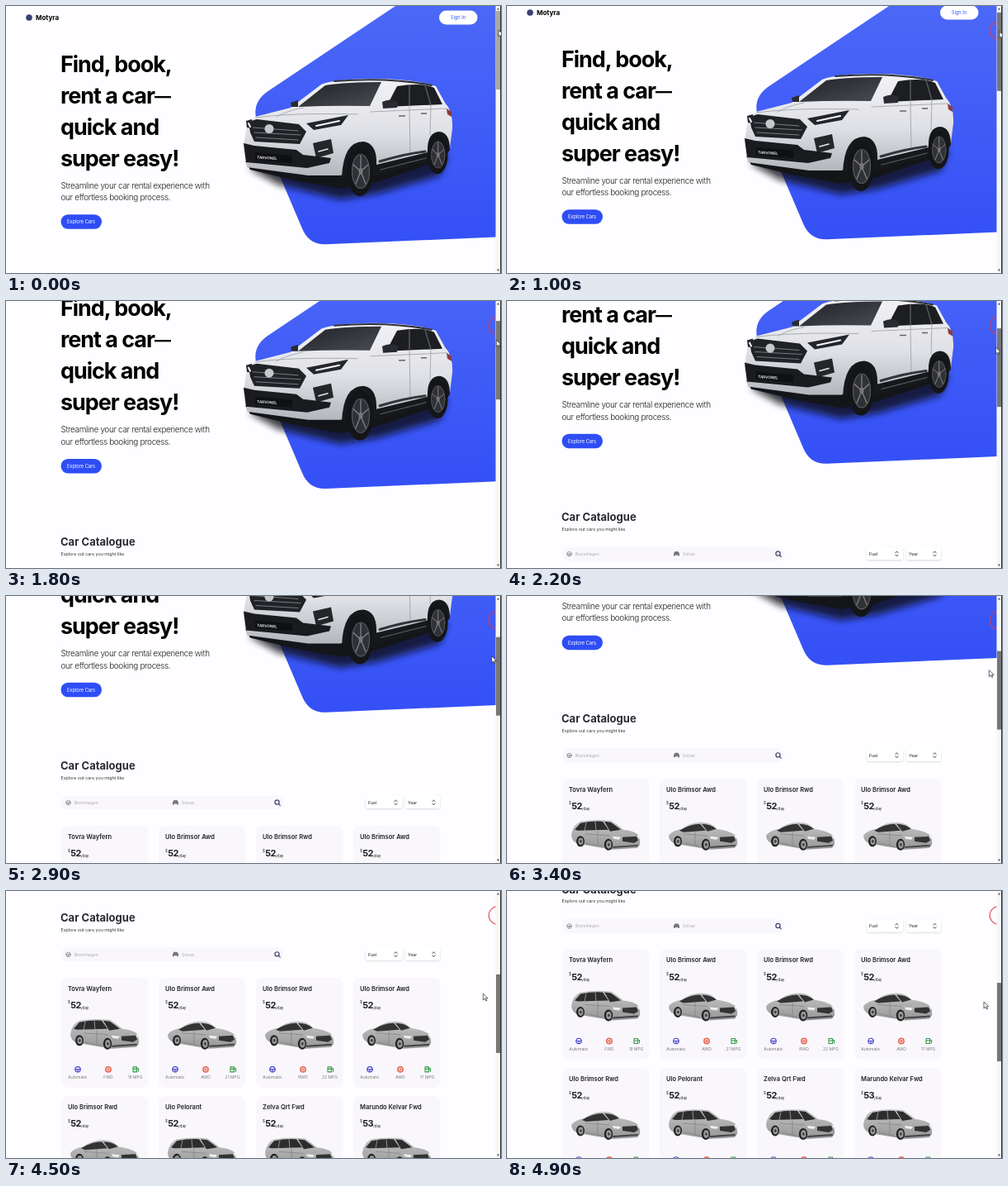
Recreate the animation shown at these times as an HTML page. Size 600 by 323 pixels, loop 5000 ms.

```html
<!DOCTYPE html>
<html lang="en">
<head>
<meta charset="utf-8">
<style>
html, body { margin: 0; width: 100%; height: 100%; overflow: hidden; background: #fefdff; }
svg { display: block; width: 600px; height: 323px; font-family: Inter, "Open Sans", sans-serif; }
.hero { font-size: 27px; font-weight: 700; letter-spacing: -1.05px; }
.lead { font-size: 10px; font-weight: 300; letter-spacing: -.375px; fill: #222; }
.mid { text-anchor: middle; font-size: 5.7px; }
.name { font-size: 7.5px; font-weight: 600; fill: #222; }
.price { font-size: 11px; font-weight: 700; letter-spacing: -.6px; fill: #222; }
.unit { font-size: 4.5px; fill: #222; }
.spec { font-size: 5px; font-weight: 300; text-anchor: middle; fill: #555; }
.hint { font-size: 5px; fill: #aaa; }
.line { fill: none; stroke-linecap: round; stroke-linejoin: round; }
</style>
</head>
<body>
<svg viewBox="0 0 600 323">
  <defs>
    <linearGradient id="blue" x1="0" y1="0" x2="0" y2="1">
      <stop offset="0" stop-color="#526ef8"/><stop offset=".3" stop-color="#4a66f7"/><stop offset="1" stop-color="#3450f6"/>
    </linearGradient>
    <linearGradient id="paint" x1="0" y1="0" x2="0" y2="1">
      <stop offset="0" stop-color="#f2f2f5"/><stop offset=".55" stop-color="#e0e1e6"/><stop offset="1" stop-color="#b4b6bd"/>
    </linearGradient>
    <linearGradient id="grey" x1="0" y1="0" x2="0" y2="1">
      <stop offset="0" stop-color="#c4c4c4"/><stop offset="1" stop-color="#969696"/>
    </linearGradient>
    <linearGradient id="glass" x1="0" y1="0" x2="1" y2="1">
      <stop offset="0" stop-color="#1f2125"/><stop offset="1" stop-color="#4a4d54"/>
    </linearGradient>
    <filter id="soft" x="-20%" y="-60%" width="140%" height="220%"><feGaussianBlur stdDeviation="4"/></filter>
    <filter id="lift" x="-10%" y="-20%" width="120%" height="160%"><feDropShadow dx="0" dy="1" stdDeviation="1" flood-opacity=".16"/></filter>

    <g id="wheel">
      <ellipse rx="16" ry="30" fill="#141518"/>
      <ellipse cx="1" rx="11" ry="21" fill="#303136"/>
      <g class="line" stroke="#85878e" stroke-width="1.200">
        <ellipse cx="1" rx="10.500" ry="20.500" stroke="#55575d"/>
        <path d="M1 0V-19M1 0L10-8M1 0L7 15M1 0L-5 15M1 0L-8-8"/>
      </g>
      <ellipse cx="1" rx="2.500" ry="4" fill="#777"/>
    </g>
    <g id="small">
      <path d="M62 18L79 17L81 22L76 25L62 23Z" fill="#333"/>
      <path d="M50 17L60 18L58 21L51 20ZM79 16L83 17L82 20Z" fill="#eee"/>
      <path class="line" d="M51 30L80 28" stroke="#444" stroke-width="2"/>
      <path class="line" d="M18 25L37 29M17 14Q32 15 46 16M32 11L32 27" stroke="#777" stroke-width=".6"/>
      <g fill="#222"><ellipse cx="11" cy="23" rx="5" ry="6.5"/><ellipse cx="45" cy="27" rx="5.2" ry="7"/></g>
      <g fill="#999"><ellipse cx="11.4" cy="23" rx="3" ry="4.4"/><ellipse cx="45.4" cy="27" rx="3.2" ry="4.8"/></g>
      <g fill="#333"><ellipse cx="11.4" cy="23" rx="1.2" ry="1.8"/><ellipse cx="45.4" cy="27" rx="1.2" ry="1.8"/></g>
    </g>
    <g id="sedan">
      <path d="M0 16Q4 10 16 8Q26 0 40 0Q52 0 58 8Q73 10 80 15Q84 20 83 27L80 31L50 33L38 31L8 26Q0 23 0 16Z" fill="url(#grey)"/>
      <path d="M13 10Q26 2 38 2L45 10L18 12ZM40 2Q51 2 58 8L47 11Z" fill="#333"/>
      <use href="#small"/>
    </g>
    <g id="van">
      <path d="M0 15Q2 3 11-1Q28-4 48-2Q56 3 63 9Q74 10 80 14Q84 20 83 27L80 31L50 33L38 31L8 26Q0 23 0 15Z" fill="url(#grey)"/>
      <path d="M4 9L11 1Q26-2 38-1L45 9L8 10ZM40-1L48 0Q55 5 60 9L47 11Z" fill="#2d2d2d"/>
      <path d="M18 0L16 10M29-1L30 10" stroke="#aaa" stroke-width=".8"/>
      <use href="#small"/>
    </g>
    <g id="specs" class="line" stroke-width="1.1">
      <g stroke="#4040c8"><circle cx="20" cy="111" r="3.2"/><path d="M17 111H23M20 111V114"/></g>
      <g stroke="#e8654f"><circle cx="57" cy="111" r="3.2" stroke-width="1.5"/><circle cx="57" cy="111" r="1.1"/></g>
      <g stroke="#359a48"><path d="M87 114V108H91.500V114ZM87 110.500H91.500M92 110H93.500V113.500"/></g>
    </g>
  </defs>

  <g id="page">
    <path d="M472 0L600-85V279.300L388 288.300Q367 289.500 358.500 268L306 145Q294.700 118 318 102.700Z" fill="url(#blue)"/>
    <circle cx="28" cy="14" r="3.800" fill="#39406f"/>
    <text x="36" y="17" font-size="8" font-weight="700">Motyra</text>
    <rect x="525" y="5.500" width="46.500" height="17" rx="8.500" fill="#fff"/>
    <text class="mid" x="548" y="16.200" fill="#3a5af8">Sign In</text>

    <g class="hero">
      <text x="66" y="79.500">Find, book,</text>
      <text x="66" y="117.500">rent a car<tspan font-size="20" dy="-2">—</tspan></text>
      <text x="66" y="155.500">quick and</text>
      <text x="66" y="193.500">super easy!</text>
    </g>
    <g class="lead">
      <text x="66.500" y="220.600">Streamline your car rental experience with</text>
      <text x="66.500" y="235">our effortless booking process.</text>
    </g>
    <rect x="66.500" y="252.300" width="49.500" height="17.500" rx="8.700" fill="#2f4df5"/>
    <text class="mid" x="91" y="263.200" fill="#fff">Explore Cars</text>

    <g id="suv">
      <path d="M294 196L330 216L405 234L450 227L526 205L535 180L440 170Z" fill="#0c0d12" opacity=".8" filter="url(#soft)"/>
      <path d="M290 188L366 202L440 196L515 178L512 192L446 214L405 221L350 211L296 198Z" fill="#141518"/>
      <path d="M288 170L292 143L302 134L345 123L382 95Q396 89 440 88Q494 88 521 97L532 117Q542 127 541 148L538 172L513 179L445 194L405 205L366 205L292 195Z" fill="url(#paint)"/>
      <path d="M354 122L387 96Q412 92 455 92L441 121Q396 120 354 122Z" fill="url(#glass)"/>
      <path d="M461 122L474 97Q504 92 519 99L529 119Z" fill="#1d1e22"/>
      <path d="M489 95L489 121M508 96L515 120" stroke="#55585f" stroke-width="1.500"/>
      <path class="line" d="M398 91Q465 86 516 96" stroke="#303238" stroke-width="2"/>
      <path class="line" d="M303 135Q345 129 426 131M360 123Q340 127 328 134M442 128L534 124M489 122L490 180M515 120L514 156" stroke="#9a9da4" stroke-width=".8"/>
      <path d="M456 116Q466 111 475 116L474 123L457 124ZM345 117L354 114L354 122L346 122Z" fill="#292b30"/>
      <path d="M294 140L304 137L355 143L364 152L356 167L301 164L296 153Z" fill="#202226"/>
      <path class="line" d="M299 147L354 151M301 153L357 156M303 159L354 162" stroke="#777b82" stroke-width="1"/>
      <path d="M364 142L415 132L406 144L373 150ZM291 139L298 137L299 148L292 147Z" fill="#24262b"/>
      <path class="line" d="M376 145L404 139M294 142L296 146" stroke="#f4f5fa" stroke-width="2"/>
      <circle cx="319" cy="148.500" r="5.500" fill="#c5c7cc"/>
      <path d="M372 166L394 161L397 178L376 184Z" fill="#24262a"/>
      <path d="M288 166L301 169L352 174L360 180L394 184L392 190L365 196L291 189Z" fill="#191b1f"/>
      <path d="M302 177L347 181V190L302 186Z" fill="#0f1013"/>
      <text x="304" y="184.500" font-size="4.600" font-weight="700" fill="#ddd" transform="rotate(4 304 184.500)">TARVONEL</text>
      <path class="line" d="M379 176L390 173" stroke="#e7e8ec" stroke-width="1.500"/>
      <path d="M407 207Q409 164 433 164Q450 166 449 192L511 177Q510 153 525 152Q538 153 538 174L532 183L511 188L448 205Z" fill="#17181b"/>
      <path class="line" d="M453 188Q483 179 508 176" stroke="#33353a" stroke-width="3"/>
      <path class="line" d="M454 198L509 184" stroke="#60636a" stroke-width="1"/>
      <path d="M534 124L540 128L540 134L535 131Z" fill="#8a3a40"/>
      <path d="M476 133H484M503 130H510" stroke="#666" stroke-width="1.500"/>
      <use href="#wheel" x="429" y="200"/>
      <use href="#wheel" transform="translate(523 180) scale(.78)"/>
    </g>

    <text x="66" y="357.600" font-size="13" font-weight="700" fill="#2b2b33">Car Catalogue</text>
    <text x="66.500" y="369.200" font-size="5.300" fill="#333">Explore out cars you might like</text>
    <rect x="67" y="389" width="269" height="17" rx="8" fill="#f9f7fc"/>
    <g class="line" stroke="#888" stroke-width=".9"><circle cx="75.500" cy="397.500" r="2.700"/><path d="M73 397.500H78M75.500 397.500V400"/></g>
    <path d="M202 400V397L203.500 394.500H207.500L209 397V400H207.500V399H203.500V400Z" fill="#777"/>
    <text class="hint" x="83" y="399.300">Brennhagen</text>
    <text class="hint" x="213" y="399.300">Solvar..</text>
    <g class="line" stroke="#3f4270" stroke-width="1.200"><circle cx="328.500" cy="397" r="2.600"/><path d="M330.500 399L332.300 400.800"/></g>
    <g id="selects"></g>
    <g id="cards"></g>
  </g>

  <circle id="ring" class="line" cx="596" cy="29.500" r="10.800" stroke="#dc3c48" stroke-opacity=".8" stroke-width="1.300"/>
  <rect x="593.500" width="6.500" height="323" fill="#f6f6f6"/>
  <path d="M595 4.500L596.500 2L598 4.500ZM595 318.500L596.500 321L598 318.500Z" fill="#555"/>
  <rect id="thumb" x="594" y="6" width="5" height="95"/>
  <rect x="599" width="1" height="323" fill="#333"/>
  <path id="cursor" d="M0 0V8L2 6.200L3.400 9L4.600 8.400L3.300 5.800H5.800Z" fill="#fff" stroke="#222" stroke-width=".7"/>
</svg>
<script>
const $ = id => document.getElementById(id);

$("selects").innerHTML = [["Fuel", 436, 44], ["Year", 484, 42]].map(([label, x, w]) => `
  <rect x="${x}" y="389.500" width="${w}" height="15" rx="3" fill="#fff" filter="url(#lift)"/>
  <text x="${x + 3}" y="399.300" font-size="5.300" fill="#222">${label}</text>
  <path class="line" d="M${x + w - 9} 396l1.500-1.700l1.500 1.700m-3 2.600l1.500 1.700l1.500-1.700" stroke="#333" stroke-width=".9"/>`).join("");

const cars = [
  ["Tovra Wayfern", 52, "van", "FWD", 19],
  ["Ulo Brimsor Awd", 52, "sedan", "AWD", 21],
  ["Ulo Brimsor Rwd", 52, "sedan", "RWD", 22],
  ["Ulo Brimsor Awd", 52, "sedan", "AWD", 17],
  ["Ulo Brimsor Rwd", 52, "sedan", "RWD", 22],
  ["Ulo Pelorant", 52, "van", "FWD", 22],
  ["Zelva Qrt Fwd", 52, "van", "FWD", 22],
  ["Marundo Kelvar Fwd", 53, "van", "FWD", 25]
];
$("cards").innerHTML = cars.map(([name, price, shape, drive, mpg], i) => `
  <g transform="translate(${67 + i % 4 * 118} ${425.5 + (i >> 2) * 143.5})">
    <rect width="105.500" height="133" rx="8" fill="#f9f7fc"/>
    <text class="name" x="8" y="15.700">${name}</text>
    <text class="unit" x="8" y="31.500">$</text>
    <text class="price" x="11.300" y="37">${price}</text>
    <text class="unit" x="24" y="38">/day</text>
    <use href="#${shape}" x="11" y="53"/>
    <use href="#specs"/>
    <text class="spec" x="20" y="122">Automatic</text>
    <text class="spec" x="57" y="122">${drive}</text>
    <text class="spec" x="89.500" y="122">${mpg} MPG</text>
  </g>`).join("");

// time, page scroll, pointer x
const keys = [
  [0, 0, 597], [600, 2, 597], [1000, 6, 597], [1200, 17, 596.5], [1500, 39, 595.5], [2200, 91.5, 592.5],
  [2900, 147.5, 588.7], [4000, 274.5, 579.5], [4900, 355, 578]
];

// smooth curve through the keys
function at(t, col) {
  const last = keys.length - 1;
  let i = 0;
  while (i < last - 1 && t >= keys[i + 1][0]) i++;
  const slope = k => {
    const a = keys[Math.max(k - 1, 0)], b = keys[Math.min(k + 1, last)];
    return (b[col] - a[col]) / (b[0] - a[0]);
  };
  const a = keys[i], b = keys[i + 1], d = b[0] - a[0], u = (t - a[0]) / d, v = 1 - u;
  return a[col] * v * v * (1 + 2 * u) + b[col] * u * u * (3 - 2 * u)
    + d * u * v * (slope(i) * v - slope(i + 1) * u);
}

function draw(now) {
  const t = Math.floor(now % 5000 / 100) * 100;
  const y = at(t, 1), bar = y * .296, held = t >= 200;
  $("page").setAttribute("transform", `translate(0 ${-y})`);
  $("thumb").setAttribute("y", 6 + bar);
  $("thumb").setAttribute("fill", held ? "#777" : "#a8a8a8");
  $("ring").setAttribute("visibility", held ? "visible" : "hidden");
  $("cursor").setAttribute("transform", `translate(${at(t, 2)} ${29 + bar})`);
}

const start = performance.now();
function tick() {
  draw(performance.now() - start);
  requestAnimationFrame(tick);
}
tick();
</script>
</body>
</html>
```
